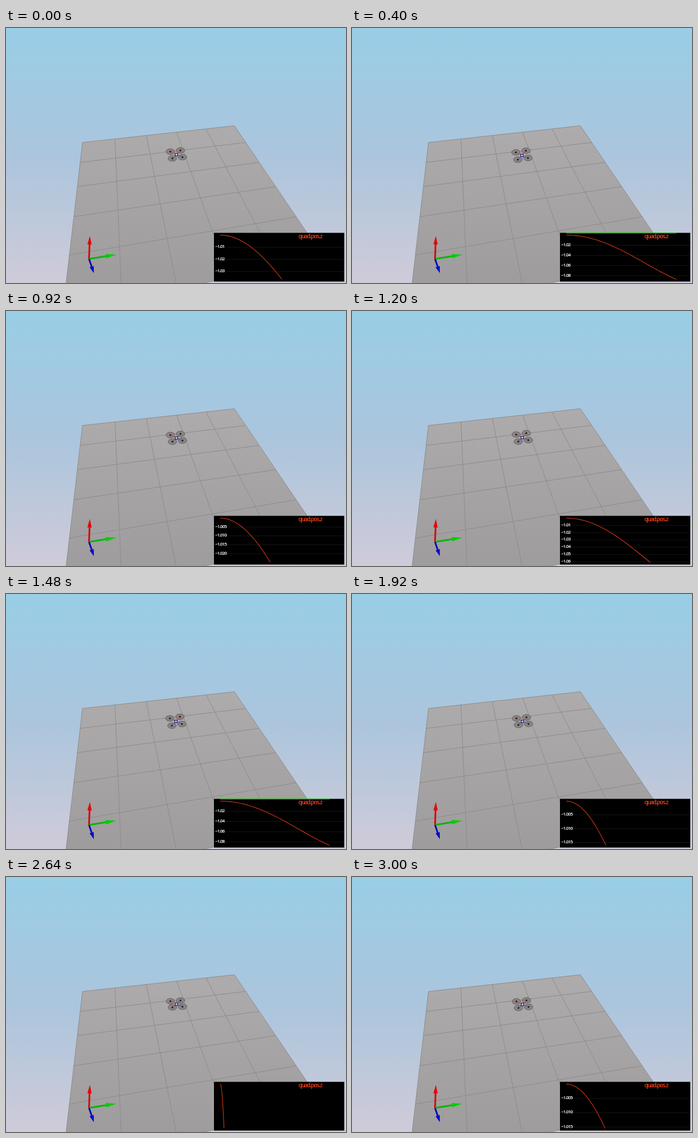
An HTML page with a canvas for the animation above (3040 ms loop, 600 px wide and 450 px high).

```html
<!DOCTYPE html>
<html lang="en">
<head>
<meta charset="utf-8">
<title>Quadrotor simulation</title>
<style>
html, body { margin: 0; width: 100%; height: 100%; overflow: hidden; }
canvas { display: block; }
</style>
</head>
<body>
<canvas id="stage" width="600" height="450"></canvas>
<script>
const ctx = document.getElementById('stage').getContext('2d');
const LOOP = 3040, STEP = 40;
const RUN = 217, SPEED = 0.2135, START = 109;   // flight length, speed and first position in plot px
const BEAT = 1440, STALL = 70;                  // the simulation hangs briefly once per beat

function path(points, { fill, stroke, width = 1 }) {
  ctx.beginPath();
  points.forEach(p => ctx.lineTo(...p));
  if (fill) { ctx.closePath(); ctx.fillStyle = fill; ctx.fill(); }
  if (stroke) { ctx.strokeStyle = stroke; ctx.lineWidth = width; ctx.stroke(); }
}

function gradient(y0, y1, ...colors) {
  const g = ctx.createLinearGradient(0, y0, 0, y1);
  colors.forEach((c, i) => g.addColorStop(i / (colors.length - 1), c));
  return g;
}

// Perspective of the floor, in cells: 5 across, 5 deep
function floorPoint(col, row) {
  const u = col / 5, v = row / 3, w = 1 + 0.0876 * u - 0.2658 * v;
  return [(135 + 303.3 * u - 47.1 * v) / w, (202 - 14.4 * u + 42.5 * v) / w];
}

function drawScene() {
  ctx.fillStyle = gradient(0, 450, '#98cee6', '#abc5dd', '#cfcbd9');
  ctx.fillRect(0, 0, 600, 450);
  const depth = 5.09, line = '#8d8b8b';
  path([[0, 0], [5, 0], [5, depth], [0, depth]].map(p => floorPoint(...p)),
    { fill: gradient(175, 450, '#aeabac', '#9e9c9d'), stroke: line });
  for (let i = 1; i < 5; i++) {
    path([floorPoint(i, 0), floorPoint(i, depth)], { stroke: line });
    path([floorPoint(0, i), floorPoint(5, i)], { stroke: line });
  }
}

// Shaft from the origin, with a cone of the given length at the tip
function arrow(tipX, tipY, cone, dark, light) {
  const x = 146.5, y = 407.5, len = Math.hypot(tipX - x, tipY - y);
  const dx = (tipX - x) / len, dy = (tipY - y) / len;
  const neckX = tipX - dx * cone, neckY = tipY - dy * cone, half = 3.8;
  path([[x, y], [neckX, neckY]], { stroke: dark, width: 3 });
  path([[neckX - dy * half, neckY + dx * half], [neckX + dy * half, neckY - dx * half], [tipX, tipY]],
    { fill: light });
}

function drawAxes() {
  arrow(148, 367, 15, '#d20a0a', '#e60000');
  arrow(194.5, 400, 18.5, '#0ab40a', '#00cd00');
  arrow(155, 432.5, 12, '#0a0ab4', '#0000d2');
}

function drawDrone(u) {
  const f = u / RUN;
  const x = 300.8 - 1.5 * f ** 4, y = 223.8 + Math.cos(2 * Math.PI * (f - 1) / 0.8);
  const wide = [10.7, 4.8 + 0.2 * f], narrow = [7.1, 6 + 2.1 * f];
  const rotors = [
    [x - wide[0], y - wide[1]], [x + narrow[0], y - narrow[1]],
    [x - narrow[0], y + narrow[1]], [x + wide[0], y + wide[1]]
  ];
  for (const r of rotors) {
    ctx.beginPath();
    ctx.ellipse(...r, 7.6, 5, 0, 0, 7);
    ctx.fillStyle = '#868485';
    ctx.fill();
    ctx.strokeStyle = '#626162';
    ctx.lineWidth = 1;
    ctx.stroke();
  }
  const body = [x, y + 0.4];
  rotors.forEach((r, i) => path([body, r], { stroke: i < 2 ? '#dc5028' : '#66668c', width: 1.3 }));
  const square = (px, py, size, color) => {
    ctx.fillStyle = color;
    ctx.fillRect(px - size / 2, py - size / 2, size, size);
  };
  rotors.forEach(r => square(...r, 2.7, '#181818'));
  square(...body, 5.6, '#28288c');
  square(...body, 2.8, '#d7d7f0');
}

// Drawn twice for the heavy look of the plot font
function text(str, x, y, size, spacing, color) {
  ctx.font = `${size}px "Open Sans", sans-serif`;
  ctx.letterSpacing = spacing + 'px';
  ctx.fillStyle = color;
  ctx.fillText(str, x, y);
  ctx.fillText(str, x + 0.5, y);
}

const drop = u => u * u * (3.42e-6 - 2.95e-11 * u * u);

function drawPlot(u) {
  const left = 378, top = 365.5, range = drop(u), scale = 78 / range;
  const yOf = d => top + d * scale;
  ctx.save();
  ctx.beginPath();
  ctx.rect(367, 361, 230, 87);
  ctx.clip();
  ctx.fillStyle = '#000';
  ctx.fillRect(367, 361.5, 230, 86);

  const step = [0.0005, 0.001, 0.002, 0.005, 0.01, 0.02].find(s => range / s <= 7);
  const digits = Math.ceil(-Math.log10(step) - 1e-9);
  ctx.textBaseline = 'middle';
  for (let d = step; d <= range; d += step) {
    const y = yOf(d);
    path([[367, y], [597, y]], { stroke: '#161616' });
    text('\u2212' + (1 + d).toFixed(digits), 369, y - 0.5, 7.5, -0.6, '#f0f0f0');
  }

  const end = left + u, goal = yOf(-0.0042);
  if (goal > 361) path([[left, goal], [end, goal]], { stroke: '#28b41e', width: 1.6 });
  const curve = Array.from({ length: 81 }, (_, i) => [left + u * i / 80, yOf(drop(u * i / 80))]);
  path(curve, { stroke: '#d23714', width: 1.1 });
  text('quad.pos.z', 516, 368.3, 10, -0.95, '#e63c14');
  ctx.restore();
}

function draw() {
  const t = Math.floor(performance.now() % LOOP / STEP) * STEP;
  const moving = BEAT - STALL;
  const simTime = Math.floor(t / BEAT) * moving + Math.min(t % BEAT, moving);
  const u = Math.max(4, (START + SPEED * simTime) % RUN);
  drawScene();
  drawAxes();
  drawDrone(u);
  drawPlot(u);
  requestAnimationFrame(draw);
}
draw();
</script>
</body>
</html>
```
